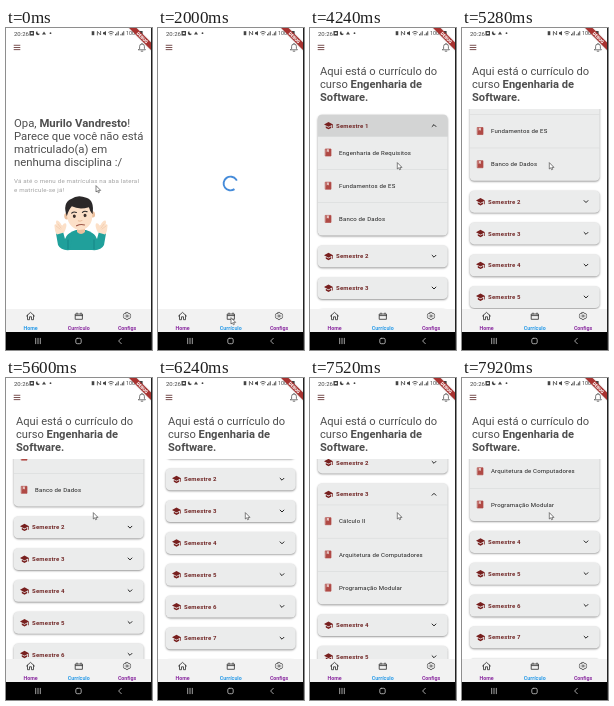
Recreate the animation shown at these times as an HTML page with a canvas. Size 146 by 322 pixels, loop 8000 ms.

```html
<!DOCTYPE html>
<html lang="pt">
<head>
<meta charset="utf-8">
<style>
html, body { margin: 0; width: 100%; height: 100%; overflow: hidden; background: #fff; }
canvas { display: block; width: 146px; height: 322px; }
</style>
</head>
<body>
<canvas></canvas>
<script>
const W = 146, H = 322, LOOP = 8000;
const LOAD_AT = 1520, LIST_AT = 2320, LIST_TOP = 81, NAV_TOP = 281;
const canvas = document.querySelector('canvas');
const ctx = canvas.getContext('2d');
const dpr = window.devicePixelRatio || 1;
canvas.width = W * dpr;
canvas.height = H * dpr;

const semesters = [
  { items: ['Engenharia de Requisitos', 'Fundamentos de ES', 'Banco de Dados'], openAt: 3960 },
  {},
  { items: ['Cálculo II', 'Arquitetura de Computadores', 'Programação Modular'], openAt: 6480 },
  {}, {}, {}, {}, {}
];
const scrollKeys = [[4900, 0], [5360, 66], [5520, 70], [5600, 79], [6240, 127], [7440, 127], [7920, 227]];
const cursorKeys = [[960, 90, 158], [1480, 73, 290], [2560, 73, 290], [3120, 87.3, 135]];

const clamp = v => Math.max(0, Math.min(1, v));
const smooth = v => v * v * (3 - 2 * v);
const identity = v => v;

function track(keys, t, col, ease = identity) {
  const next = keys.findIndex(k => k[0] > t);
  if (next === 0) return keys[0][col];
  if (next < 0) return keys[keys.length - 1][col];
  const a = keys[next - 1], b = keys[next];
  return a[col] + (b[col] - a[col]) * ease((t - a[0]) / (b[0] - a[0]));
}

function text(str, x, y, size, color, { weight = 400, spacing = 0, align = 'left' } = {}) {
  ctx.font = `${weight} ${size}px Roboto, sans-serif`;
  ctx.letterSpacing = spacing + 'px';
  ctx.textAlign = align;
  ctx.fillStyle = color;
  ctx.fillText(str, x, y);
  return ctx.measureText(str).width;
}

// Draws runs of [string, weight] one after another
function runs(parts, x, y, size, color) {
  for (const [str, weight] of parts) x += text(str, x, y, size, color, { weight });
}

function rect(x, y, w, h, color) {
  ctx.fillStyle = color;
  ctx.fillRect(x, y, w, h);
}

function shape(d, x, y, { fill, stroke, width = 0.8, scale = 1, angle = 0 }) {
  const path = new Path2D(d);
  ctx.save();
  ctx.translate(x, y);
  ctx.rotate(angle);
  ctx.scale(scale, scale);
  ctx.lineCap = ctx.lineJoin = 'round';
  if (fill) { ctx.fillStyle = fill; ctx.fill(path); }
  if (stroke) { ctx.strokeStyle = stroke; ctx.lineWidth = width; ctx.stroke(path); }
  ctx.restore();
}

function ellipse(x, y, rx, ry, color, angle = 0) {
  ctx.beginPath();
  ctx.ellipse(x, y, rx, ry, angle, 0, Math.PI * 2);
  ctx.fillStyle = color;
  ctx.fill();
}

function statusBar() {
  const ink = '#444';
  text('20:26', 8, 7.5, 6, ink);
  rect(23.5, 3, 4.5, 4.6, ink);
  rect(24.8, 4.4, 2, 1.6, '#fff');
  shape('M-.8-2.2Q-3-.8-1.6 1.2Q.4 3 2 .6Q-.8 .8-.8-2.2Z', 32, 5.2, { fill: ink });
  shape('M0-2L2 1H-2Z', 38, 5.6, { fill: ink });
  ellipse(44.5, 5.2, 0.9, 0.9, ink);
  shape('M-1.3-2H1.3V2H-1.3Z', 87, 5.2, { fill: ink });
  shape('M-1.6 1.8V-1.8L1.6 1.8V-1.8', 93, 5.2, { stroke: ink });
  shape('M-2-1H-1L1-2.2V2.2L-1 1H-2Z', 99, 5.2, { fill: ink });
  shape('M-2.4-1Q0-3 2.4-1M-1.4 .5Q0-.8 1.4 .5M0 1.8V1.9', 105, 5.2, { stroke: ink });
  for (const x of [109, 114.5])
    for (let i = 0; i < 3; i++) rect(x + i * 1.4, 6 - i * 1.4, 0.9, 1.4 + i * 1.4, ink);
  text('100%', 120, 7.3, 5.4, ink);
  rect(134, 3, 2.6, 4.5, ink);
}

function appBar() {
  for (let i = 0; i < 3; i++) rect(7.7, 16.8 + i * 2.2, 6.6, 0.9, '#6c4040');
  shape('M-3.4 2.4H3.4L2.4 1V-1A2.4 2.4 0 0 0-2.4-1V1ZM-.8 3.8H.8M0-3.5V-4', 136, 19.4, { stroke: '#555' });
}

function debugBanner() {
  ctx.save();
  ctx.translate(136.4, 9.6);
  ctx.rotate(Math.PI / 4);
  ctx.shadowColor = 'rgba(0,0,0,.3)';
  ctx.shadowBlur = 1.5 * dpr;
  rect(-22, -2.6, 44, 5.2, '#a83230');
  ctx.shadowColor = 'transparent';
  text('DEBUG', 0, 1.6, 4.4, '#fff', { weight: 900, align: 'center' });
  ctx.restore();
}

function shrugMan() {
  const skin = '#fce0c8', shade = '#ebbf9d', hair = '#2b2829', teal = '#20a09b', dark = '#147f82';
  ctx.save();
  ctx.translate(75, 195);
  shape('M-14 27V15Q-12 9-5 7H5Q12 9 14 15V27Z', 0, 0, { fill: teal });
  for (const side of [-1, 1]) {
    ctx.save();
    ctx.scale(side, 1);
    shape('M8 9Q14 10 16 16L18 8.5L25 10.5L23 22Q20 28 11 27Z', 0, 0, { fill: teal });
    shape('M13 17V26', 0, 0, { stroke: dark, width: 0.8 });
    shape('M17 9.5Q13.5 3 15 .5Q17-.5 18.5 2.5L19.5 2Q22-3 24.5-2.5Q25.8-1 24.5 1.5Q27.2 .5 26.4 4Q26 9.5 24 11.5Z', 0, 0, { fill: skin });
    shape('M20 5L23 1M21 6L25 3', 0, 0, { stroke: shade, width: 0.5 });
    ctx.restore();
  }
  shape('M-4 4H4V9Q0 13-4 9Z', 0, 0, { fill: shade });
  ctx.translate(-0.5, 1.8);
  ctx.scale(1.17, 1.06);
  ctx.rotate(-0.08);
  ellipse(-11, -9, 2.2, 3, shade);
  ellipse(11, -9, 2.2, 3, shade);
  ellipse(0, -9, 10.8, 13.8, skin);
  shape('M-11-9Q-14-22-6-25Q0-29 7-25Q14-22 11-9Q9-12 8.5-16Q0-14-6-18Q-9-15-11-9Z', 0, 0, { fill: hair });
  for (const x of [-4.6, 4.6]) {
    ellipse(x, -8.5, 1.3, 1.6, '#3d302c');
    shape('M-2 .4Q0-1.2 2 .2', x, -12, { stroke: hair, width: 1 });
  }
  shape('M-1.5-4Q0-3 1.5-4', 0, 0, { stroke: shade, width: 1 });
  shape('M-3.4 .7Q0-1 3.4 .4', 0, 0, { stroke: '#9b5546', width: 1 });
  ctx.restore();
}

function homePage() {
  const ink = '#4e4e4e', gray = { spacing: 0.19 };
  runs([['Opa, ', 400], ['Murilo Vandresto', 700], ['!', 400]], 8, 98.5, 11.35, ink);
  ['Parece que você não está', 'matriculado(a) em', 'nenhuma disciplina :/']
    .forEach((line, i) => text(line, 8, 111.8 + i * 13.3, 11.35, ink));
  text('Vá até o menu de matrículas na aba lateral', 8, 155.3, 6.2, '#a2a2a2', gray);
  text('e matricule-se já!', 8, 164.1, 6.2, '#a2a2a2', gray);
  shrugMan();
}

function spinner(t) {
  const start = (t - 2000) / 1000 * Math.PI * 2 + 0.95;
  const sweep = 4.9 + 0.5 * Math.sin((t - 2000) / 210);
  ctx.beginPath();
  ctx.arc(72.5, 155.5, 6.9, start, start + sweep);
  ctx.strokeStyle = '#458bd9';
  ctx.lineWidth = 1.9;
  ctx.lineCap = 'butt';
  ctx.stroke();
}

function card(semester, number, mid, t) {
  const { items = [], openAt = Infinity } = semester;
  const open = smooth(clamp((t - openAt) / 200));
  const x = 7.7, w = 130, top = mid - 11, height = 22 + 99 * open;
  const box = new Path2D();
  box.roundRect(x, top, w, height, 4.5);
  ctx.save();
  ctx.shadowColor = 'rgba(0,0,0,.4)';
  ctx.shadowBlur = 2 * dpr;
  ctx.shadowOffsetY = 0.9 * dpr;
  ctx.fillStyle = '#ebecec';
  ctx.fill(box);
  ctx.restore();

  ctx.save();
  ctx.clip(box);
  const press = clamp((t - openAt + 60) / 100) * (1 - clamp((t - openAt - 320) / 320));
  if (press > 0) rect(x, top, w, 22, `rgba(0,0,0,${0.1 * press})`);
  if (open > 0) {
    items.forEach((name, i) => {
      const y = mid + 27 + i * 33.2;
      rect(x, y - 16.5, w, 0.5, '#d3d5d5');
      shape('M-2.7-3.5H2.7V3.5H-2.7Z', 18.3, y, { fill: '#b04a45', stroke: '#b04a45', width: 0.7 });
      shape('M-1.6-3.3H.6V-.3L-.5-1L-1.6-.3Z', 18.3, y, { fill: '#e7c5c2' });
      text(name, 29, y + 2.1, 6, '#1c1c1c', { spacing: 0.19 });
    });
  }
  ctx.restore();

  shape('M-5-1.2L0-4L5-1.2L0 1.5ZM-3 .7V2.7L0 4.3L3 2.7V.7L0 2.4ZM4.2-.8H5V2.8H4.2Z', 18.5, mid, { fill: '#78201f', scale: 0.9 });
  text('Semestre ' + number, 26, mid + 2.1, 6, '#702625', { weight: 700, spacing: 0.19 });
  shape('M-1.9-1L0 .9L1.9-1', 124, mid, { stroke: '#222', width: 1, angle: Math.PI * open });
  return 99 * open;
}

function listPage(t) {
  const ink = '#4e4e4e';
  text('Aqui está o currículo do', 10, 46.6, 11.15, ink);
  runs([['curso ', 400], ['Engenharia de', 700]], 10, 59.8, 11.15, ink);
  text('Software.', 10, 73, 11.15, ink, { weight: 700 });
  ctx.save();
  ctx.beginPath();
  ctx.rect(0, LIST_TOP, W, NAV_TOP - LIST_TOP);
  ctx.clip();
  let y = 97.5 - track(scrollKeys, t, 1);
  semesters.forEach((semester, i) => {
    y += card(semester, i + 1, y, t) + 31.8;
  });
  ctx.restore();
}

function navBars(t) {
  rect(0, NAV_TOP, W, 23, '#f2f2f2');
  const active = t < LOAD_AT ? 0 : 1, ink = '#2c2c2c';
  shape('M-4 0L0-3.6L4 0M-3-.8V3.7H-1V.8H1V3.7H3V-.8', 24.5, 288, { stroke: ink });
  shape('M-3.4-2H3.4V3.3H-3.4ZM-3.4-.4H3.4M-2-3V-2M2-3V-2', 73, 288, { stroke: ink });
  shape('M-1-3.8H1L1.5-2.5L3-2.7L4-.9L3 0L4 .9L3 2.7L1.5 2.5L1 3.8H-1L-1.5 2.5L-3 2.7L-4 .9L-3 0L-4-.9L-3-2.7L-1.5-2.5ZM1.2 0A1.2 1.2 0 1 0-1.2 0A1.2 1.2 0 1 0 1.2 0', 121, 288, { stroke: ink, width: 0.7, scale: 0.93 });
  ['Home', 'Currículo', 'Configs'].forEach((label, i) =>
    text(label, 24.5 + i * 48.3, 301.5, 5.3, i === active ? '#2a9be8' : '#8a2ba0', { weight: 700, align: 'center' }));
  rect(0, 304, W, 18, '#000');
  shape('M-2.3-2.7V2.7M0-2.7V2.7M2.3-2.7V2.7', 32, 313, { stroke: '#ccc', width: 0.8 });
  shape('M-1.2-2.7H1.2Q2.7-2.7 2.7-1.2V1.2Q2.7 2.7 1.2 2.7H-1.2Q-2.7 2.7-2.7 1.2V-1.2Q-2.7-2.7-1.2-2.7', 72.5, 313, { stroke: '#ccc' });
  shape('M1.3-2.7L-1.4 0L1.3 2.7', 114, 313, { stroke: '#ccc' });
}

function cursor(t) {
  const x = track(cursorKeys, t, 1, smooth), y = track(cursorKeys, t, 2, smooth);
  shape('M0 0V6L1.4 4.8L2.4 6.8L3.4 6.3L2.5 4.4H4.3Z', x, y, { fill: '#fff', stroke: '#333', width: 0.6 });
}

function draw(t) {
  ctx.setTransform(dpr, 0, 0, dpr, 0, 0);
  rect(0, 0, W, H, '#fff');
  statusBar();
  appBar();
  if (t < LOAD_AT) homePage();
  else if (t < LIST_AT) spinner(t);
  else listPage(t);
  navBars(t);
  debugBanner();
  rect(145, 0, 1, H, '#222');
  cursor(t);
}

const begin = performance.now();
function frame() {
  draw((performance.now() - begin) % LOOP);
  requestAnimationFrame(frame);
}
frame();
</script>
</body>
</html>
```
